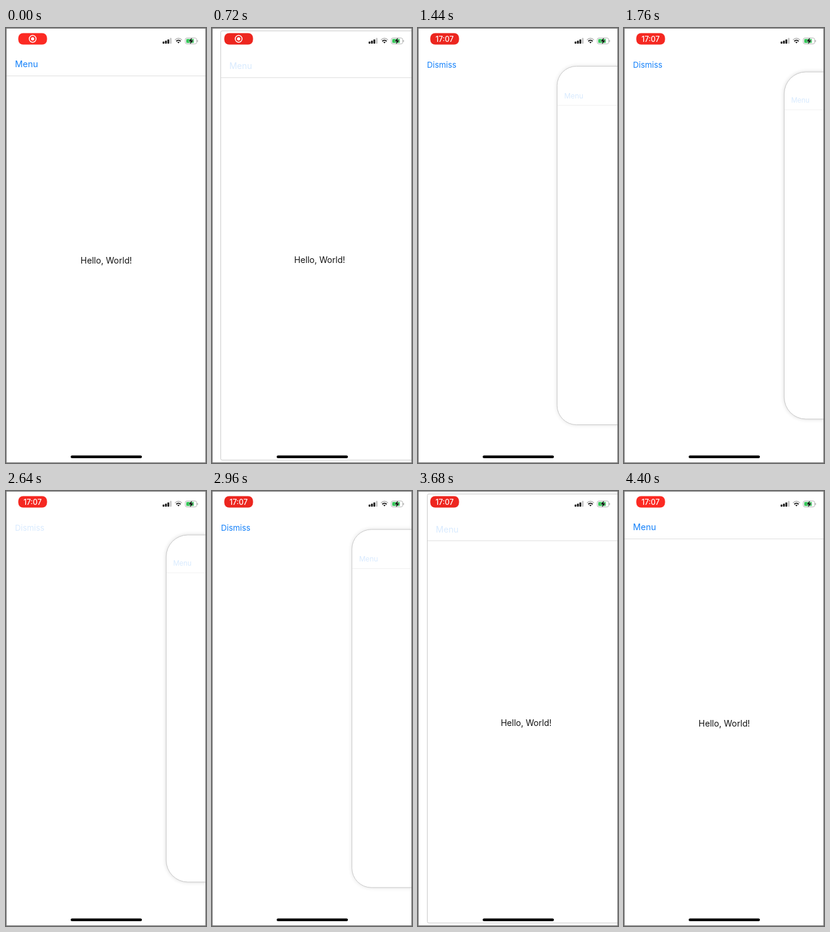
Animation, 334 px wide and 722 px high, one loop 4480 ms. Source, as an HTML page:

```html
<!DOCTYPE html>
<html lang="en">
<head>
<meta charset="utf-8">
<title>Side menu</title>
<style>
html, body { margin: 0; width: 100%; height: 100%; overflow: hidden; background: #fff; }
svg { display: block; width: 334px; height: 722px; font-family: Inter, Roboto, sans-serif; }
.link { fill: #1380fa; }
</style>
</head>
<body>
<svg viewBox="0 0 334 722">
  <defs>
    <filter id="blur" x="-20%" y="-10%" width="140%" height="120%">
      <feGaussianBlur stdDeviation="4.5"/>
    </filter>
  </defs>
  <rect width="334" height="722" fill="#fff"/>
  <text id="dismiss" class="link" x="15" y="65.5" font-size="13.4">Dismiss</text>

  <g id="card">
    <rect id="shadow" x=".5" y="1" width="333" height="720" filter="url(#blur)"/>
    <rect id="panel" x=".5" y="1" width="333" height="720" fill="#fff" stroke="#c9c9c9"/>
    <path id="rule" d="M1 79.5H333" stroke="#dfdfdf"/>
    <text id="menu" class="link" x="15" y="65.2" font-size="14.4">Menu</text>
    <text x="167.5" y="390.5" font-size="14.2" text-anchor="middle" fill="#111">Hello, World!</text>
  </g>

  <rect id="pill" x="20.5" y="8.5" width="48" height="19" rx="8"/>
  <g id="record" fill="#fff">
    <circle cx="44.5" cy="18" r="5.7" fill="none" stroke="#fff" stroke-width="1.5"/>
    <circle cx="44.5" cy="18" r="2.7"/>
  </g>
  <text id="clock" x="44.5" y="22.7" font-size="12.4" font-weight="500" text-anchor="middle" fill="#fff">17:07</text>

  <g id="bars"></g>
  <g fill="none" stroke="#111" stroke-width="1.8">
    <path d="M282.2 19.8Q288 14.6 293.8 19.8" stroke="#b9b9b9" stroke-width="1.6"/>
    <path d="M284.3 22Q288 18.8 291.7 22"/>
    <path d="M286 23.6Q288 22.2 290 23.6L288 25.6Z" fill="#111" stroke="none"/>
  </g>
  <rect x="299.3" y="16.6" width="19.2" height="9.8" rx="2.8" fill="#fff" stroke="#b2b2b2"/>
  <rect x="301" y="18.2" width="12.6" height="6.6" rx="1.4" fill="#35c759"/>
  <path d="M319.9 20V23.2" stroke="#b2b2b2" stroke-width="1.3"/>
  <path d="M310.6 15.8L305 22.2H308.4L307.2 27.2L313 20.6H309.5Z" fill="#111" stroke="#fff" stroke-width=".7" paint-order="stroke"/>

  <rect x="108" y="709.6" width="119" height="4.4" rx="2.2" fill="#000"/>
  <rect x=".5" y=".5" width="333" height="721" fill="none" stroke="#737373"/>
</svg>
<script>
const LOOP = 4480, MOVE = 1230, OPEN = 522, CLOSE = 2656;
const $ = id => document.getElementById(id);
const set = (id, attrs) => {
  for (const k in attrs) $(id).setAttribute(k, attrs[k]);
};
const ramp = (t, a, b) => Math.min(1, Math.max(0, (t - a) / (b - a)));
const mix = (a, b, k) => a + (b - a) * k;

$("bars").innerHTML = [3.4, 5, 7, 9.4].map((h, i) =>
  `<rect x="${261.6 + i * 4}" y="${26 - h}" width="2.9" height="${h}" rx=".8" fill="${i < 3 ? "#111" : "#c4c4c4"}"/>`
).join("");

// cubic-bezier(.42, 0, .58, 1)
function ease(x) {
  let lo = 0, hi = 1;
  for (let i = 0; i < 24; i++) {
    const u = (lo + hi) / 2, v = 1 - u;
    if (1.26 * u * v * v + 1.74 * u * u * v + u * u * u < x) lo = u; else hi = u;
  }
  return lo * lo * (3 - 2 * lo);
}

function draw(t) {
  const p = ease(ramp(t, OPEN, OPEN + MOVE)) - ease(ramp(t, CLOSE, CLOSE + MOVE));
  const scale = 1 - 0.2 * p;
  set("card", { transform: `translate(${267.2 * p} ${72.2 * p}) scale(${scale})` });
  set("panel", { rx: 45 * p, "stroke-opacity": Math.min(1, p * 25), "stroke-width": 1 / scale });
  set("shadow", { rx: 45 * p, opacity: 0.17 * p * p });
  set("rule", { opacity: 1 - 0.5 * p });

  const menuDim = ramp(t, 420, 520) - ramp(t, 3800, 3900);
  set("menu", { opacity: mix(1, 0.16, menuDim) });
  const dismissDim = ramp(t, 2540, 2620) - ramp(t, 2700, 2900);
  set("dismiss", { opacity: mix(1, 0.16, dismissDim), visibility: p > 0 ? "visible" : "hidden" });

  const swap = ramp(t, 1000, 1240);
  set("record", { opacity: 1 - swap });
  set("clock", { opacity: swap });
  const glow = 0.5 + 0.5 * Math.cos(2 * Math.PI * t / 2200);
  set("pill", { fill: `rgb(${mix(231, 252, glow)},${mix(37, 42, glow)},${mix(30, 35, glow)})` });
}

function tick() {
  draw(performance.now() % LOOP);
  requestAnimationFrame(tick);
}
tick();
</script>
</body>
</html>
```
